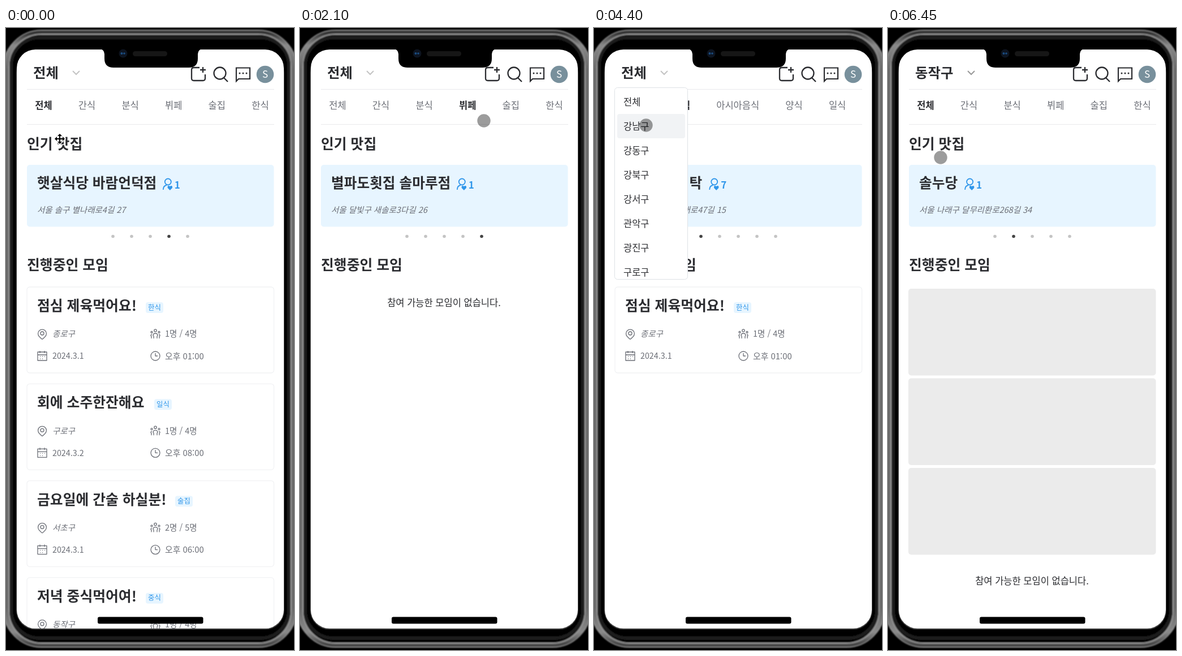
Animation of 509 by 1100 pixels, one loop 6600 ms. Source, as an HTML page:

```html
<!DOCTYPE html>
<html lang="ko">
<head>
<meta charset="utf-8">
<style>
html, body { margin: 0; width: 100%; height: 100%; overflow: hidden; background: #000; }
svg { display: block; width: 509px; height: 1100px; font-family: "Noto Sans CJK KR", "Noto Sans CJK", sans-serif; }
text { white-space: pre; }
</style>
</head>
<body>
<svg viewBox="0 0 509 1100">
  <defs>
    <clipPath id="screen"><rect x="19" y="38" width="472" height="1024" rx="33"/></clipPath>
    <clipPath id="tabs"><rect x="37" y="110" width="437" height="60"/></clipPath>
    <clipPath id="slides"><rect x="36" y="240" width="438" height="114"/></clipPath>
    <clipPath id="menu"><rect x="37" y="106" width="128" height="338"/></clipPath>
    <linearGradient id="metal" x2="0" y2="1">
      <stop offset="0" stop-color="#333"/><stop offset=".02" stop-color="#8a8a8a"/>
      <stop offset=".06" stop-color="#666"/><stop offset=".94" stop-color="#666"/>
      <stop offset=".98" stop-color="#8a8a8a"/><stop offset="1" stop-color="#444"/>
    </linearGradient>
    <filter id="soft" x="-5%" width="110%"><feGaussianBlur stdDeviation=".9"/></filter>
  </defs>
  <g filter="url(#soft)">
    <rect x="-5" y="4" width="519" height="1091" rx="68" stroke="#a0a0a0" stroke-width="2"/>
    <rect x="0" y="9" width="509" height="1081" rx="62" stroke="url(#metal)" stroke-width="9"/>
    <rect x="5" y="11" width="499" height="1077" rx="58" stroke="#9c9c9c" stroke-width="2"/>
    <rect x="9" y="17" width="491" height="1062" rx="50" stroke="#1c1c1c" stroke-width="6"/>
  </g>
  <rect x="18" y="45" width="474" height="1019" rx="34" fill="#3c3c3c"/>
  <rect x="19" y="38" width="472" height="1024" rx="33" fill="#fff"/>
  <g id="view" clip-path="url(#screen)"></g>
  <path d="M165 37h183q-8 0-9 9v8q0 16-16 16H190q-16 0-16-16v-8q-1-9-9-9z"/>
  <rect x="224" y="41" width="61" height="9" rx="4.5" fill="#161616"/>
  <circle cx="207" cy="45" r="7.5" fill="#0d1420"/>
  <circle cx="204.5" cy="45" r="2" fill="#1b4c80"/><circle cx="209" cy="45" r="1.8" fill="#1b4c80"/>
  <rect x="162" y="1041.500" width="186.500" height="12" rx="3"/>
</svg>
<script>
const LOOP = 6600;
const INK = '#2b2c30', GRAY = '#6b6e76', BLUE = '#2f96ea';

const ICONS = {
  pin: 'M9 11a3 3 0 1 0 6 0a3 3 0 0 0-6 0M17.2 16.7L13.4 20.500a2 2 0 0 1-2.8 0L6.8 16.7a7.400 7.400 0 1 1 10.4 0z',
  people: 'M9.8 6a2.200 2.200 0 1 0 4.400 0a2.200 2.200 0 0 0-4.400 0M9 20v-4l-1-1q0-4 4-4t4 4l-1 1v4' +
    'M4 9a1.500 1.500 0 1 0 3 0a1.500 1.500 0 0 0-3 0M17 9a1.500 1.500 0 1 0 3 0a1.500 1.500 0 0 0-3 0' +
    'M5 20v-4q-1 0-1-1q0-2 2-2M19 20v-4q1 0 1-1q0-2-2-2',
  calendar: 'M4 5h16v15H4zM8 3v4M16 3v4M4 10h16M8 13h1M12 13h1M16 13h1M8 17h1M12 17h1',
  clock: 'M4 12a8 8 0 1 0 16 0a8 8 0 0 0-16 0M12 7v5h4',
};

const PLACES = [
  ['초록창문식탁', 7, '서울 해늘구 고래대로47길 15'],
  ['솔누당', 1, '서울 나래구 달무리환로268길 34'],
  null,
  ['햇살식당 바람언덕점', 1, '서울 솔구 별나래로4길 27'],
  ['별파도횟집 솔마루점', 1, '서울 달빛구 새솔로3다길 26'],
];
const MEETINGS = [
  ['점심 제육먹어요!', 247, '한식', '종로구', '1명 / 4명', '2024.3.1', '오후 01:00'],
  ['회에 소주한잔해요', 262, '일식', '구로구', '1명 / 4명', '2024.3.2', '오후 08:00'],
  ['금요일에 간술 하실분!', 299, '술집', '서초구', '2명 / 5명', '2024.3.1', '오후 06:00'],
  ['저녁 중식먹어여!', 247, '중식', '동작구', '1명 / 4명', '2024.3.1', '오후 07:00'],
];
const TABS = ['전체', '간식', '분식', '뷔페', '술집', '한식', '아시아음식', '양식', '일식', '중식'];
const DISTRICTS = ['전체', ...'강남 강동 강북 강서 관악 광진 구로 금천 노원 도봉 동대문 동작 마포 서대문 서초'
  .split(' ').map(name => name + '구')];

// Keyframes: [time, value, ...]
const CURSOR = [[0, 95, 196], [500, 95, 190], [800, 143, 140], [1000, 145, 140], [1200, 210, 143], [1400, 219, 143],
  [1800, 296, 148], [2100, 325, 164], [2400, 375, 142], [2600, 400, 140], [2700, 422, 139], [3000, 451, 139],
  [3200, 449, 139], [3700, 175.500, 144], [4000, 120, 80], [4200, 118, 80], [4400, 92, 172], [4500, 110, 165],
  [4800, 266, 140], [5200, 255, 140], [5400, 130, 140], [5700, 400, 140], [5900, 70, 140],
  [6000, 120, 79], [6200, 92, 222], [6300, 93, 229]];
const SCROLL = [[3200, 0], [3700, 228.5], [4000, 294.5], [5400, 294.5], [5800, 0]];
const MENU_SCROLL = [[6000, 0], [6300, 418]];
const SLIDES = [[300, 3], [3100, 4], [5850, 0]];
// Steps: [time, value]
const TAB = [[0, 0], [900, 1], [1400, 2], [1800, 3], [2400, 4], [3200, 5], [4900, 6], [5900, 0]];
const DISTRICT = [[0, '전체'], [4500, '강남구'], [6450, '동작구']];
const LIST = [[0, [0, 1, 2, 3]], [900, []], [2500, [2]], [3200, [0]], [4500, []]];
const LOADING = [[1400, 1500], [1800, 1900], [2400, 2500], [4500, 4700], [4900, 5000], [6450, 6600]];
const MENU_OPEN = [[4100, 4500], [6000, 6450]];

const step = (keys, t) => keys.findLast(k => k[0] <= t)[1];
const within = (spans, t) => spans.some(([a, b]) => t >= a && t < b);
function tween(keys, t) {
  const i = keys.findIndex(k => k[0] > t);
  if (i <= 0) return keys.at(i).slice(1);
  const a = keys[i - 1], b = keys[i], p = (t - a[0]) / (b[0] - a[0]);
  return a.slice(1).map((v, j) => v + (b[j + 1] - v) * p);
}

const text = (x, cy, size, s, color = INK, attrs = '') =>
  `<text x="${x}" y="${cy + size * .37}" font-size="${size}" fill="${color}" ${attrs}>${s}</text>`;
const BOLD = 'font-weight="700"', ITALIC = 'font-style="italic"', MIDDLE = 'text-anchor="middle"';
const rect = (x, y, w, h, r, fill, attrs = '') =>
  `<rect x="${x}" y="${y}" width="${w}" height="${h}" rx="${r}" fill="${fill}" ${attrs}/>`;
const line = (d, color, width = 1, attrs = '') =>
  `<path d="${d}" fill="none" stroke="${color}" stroke-width="${width}" ${attrs}/>`;
const dot = (x, y, r, fill, attrs = '') => `<circle cx="${x}" cy="${y}" r="${r}" fill="${fill}" ${attrs}/>`;
const icon = (name, cx, cy) =>
  line(ICONS[name], GRAY, 1.3, `transform="translate(${cx - 12} ${cy - 12})" stroke-linejoin="round"`);

function header(t) {
  const name = step(DISTRICT, t), x = name.length > 2 ? 147 : 124;
  return text(48, 79, 24.4, name, INK, BOLD) +
    line(`M${x - 6} 76l6 6l6-6`, t >= 6450 ? '#999' : '#c4c4c4', 2) +
    line('M342 70h-10q-4 0-4 4v15q0 4 4 4h16q4 0 4-4v-7M348 69v10M343 74h10', INK, 2.3) +
    line('M367.5 80a10.5 10.5 0 1 0 21 0a10.5 10.5 0 0 0-21 0M385 88l7 7', INK, 2.3) +
    line('M407 94V70.5h24V90H411z', INK, 2.2) +
    [413, 419, 425].map(x => dot(x, 80, 1.5, INK)).join('') +
    dot(458, 82, 15.3, '#78909c') + text(458, 82, 17, 'S', '#fff', MIDDLE) +
    line('M37 108.5H474M37 170.5H474', '#e9e9ec');
}

function tabs(t) {
  const active = step(TAB, t), [scroll] = tween(SCROLL, t);
  const items = TABS.map((name, i) => {
    const x = 66.4 + 76.6 * i + (i > 5 ? 22.7 : 0) + (i > 6 ? 22.7 : 0);
    return text(x - scroll, 137, 16.5, name, i === active ? INK : GRAY, MIDDLE + (i === active ? ' ' + BOLD : ''));
  });
  return `<g clip-path="url(#tabs)">${items.join('')}</g>`;
}

function place([name, fans, address], x) {
  const spaces = name.split(' ').length - 1;
  const end = 55 + (name.length - spaces) * 22.7 + spaces * 5.5;
  const ix = end + 12;
  return `<g transform="translate(${x})">${rect(37, 242, 436.5, 109.5, 5, '#e7f5ff')}` +
    text(55, 274, 24.7, name, INK, BOLD) + text(55, 322, 14.5, address, GRAY, ITALIC) +
    text(end + 33, 278, 17, fans, BLUE, BOLD) +
    line(`M${ix + 4} 272a5.5 5.5 0 1 0 11 0a5.5 5.5 0 0 0-11 0M${ix + 1} 286q0-7 6-8`, BLUE, 1.8) +
    `<path d="M${ix + 13} 287l-4-4q-1-4 2-4l2 1l2-1q3 0 2 4z" fill="${BLUE}"/></g>`;
}

function carousel(t) {
  let current = 3, shift = 0;
  for (const [start, from] of SLIDES) {
    if (t <= start) break;
    const p = Math.min(1, (t - start) / 450);
    current = (from + 1) % 5;
    shift = 440 * (1 - p) ** 2;
  }
  const cards = place(PLACES[current], shift) + (shift ? place(PLACES[(current + 4) % 5], shift - 440) : '');
  return `<g clip-path="url(#slides)">${cards}</g>` +
    [0, 1, 2, 3, 4].map(i => dot(189 + 33 * i, 368.5, 2.8, i === current ? '#444' : '#c4c4c4')).join('');
}

function meeting([title, tagX, tag, district, people, date, hour], y) {
  return rect(37, y, 436.5, 152, 5, '#fff', 'stroke="#f1f2f4" stroke-width="1.3"') +
    text(55, y + 33, 24.8, title, INK, BOLD) +
    rect(tagX, y + 27, 31, 19, 4, '#e7f5ff') + text(tagX + 15.5, y + 36, 12.4, tag, BLUE, MIDDLE) +
    icon('pin', 64, y + 83) + text(82, y + 83, 14.4, district, GRAY, ITALIC) +
    icon('people', 264, y + 83) + text(281, y + 83, 14.5, people, GRAY) +
    icon('calendar', 64, y + 122) + text(82, y + 122, 14.3, date, GRAY) +
    icon('clock', 264, y + 122) + text(281, y + 122, 14.9, hour, GRAY);
}

function list(t) {
  const loading = within(LOADING, t), shown = step(LIST, t);
  const empty = y => text(254.5, y, 16.5, '참여 가능한 모임이 없습니다.', INK, MIDDLE);
  if (loading) return [461, 619.5, 778].map(y => rect(36, y, 437.5, 153.5, 5, '#ebebeb')).join('') + empty(978);
  return shown.map((m, i) => meeting(MEETINGS[m], 458 + 171.3 * i)).join('') || empty(486);
}

function menu(t) {
  if (!within(MENU_OPEN, t)) return '';
  const [scroll] = tween(MENU_SCROLL, t), [, cursorY] = tween(CURSOR, t);
  const options = DISTRICTS.map((name, i) => {
    const y = 109 + 43 * i - scroll, hover = cursorY >= y && cursorY < y + 43;
    return (hover ? rect(41, y, 120, 43, 4, '#f1f3f5') : '') + text(52, y + 21.5, 16.5, name);
  });
  return rect(36.5, 105.5, 129, 339, 5, '#fff', 'stroke="#dee2e6"') +
    `<g clip-path="url(#menu)">${options.join('')}</g>`;
}

function cursor(t) {
  const [x, y] = tween(CURSOR, t);
  if (t >= 100) return dot(x, y, 11.7, '#000', 'opacity=".39"');
  const arrows = 'M0-9l4 4H1v4h4v-3l4 4l-4 4V1H1v4h3l-4 4l-4-4h3V1h-4v3l-4-4l4-4v3h4v-4h-3z';
  return `<path d="${arrows}" transform="translate(${x} ${y})" stroke="#fff" stroke-width="3" paint-order="stroke"/>`;
}

const view = document.getElementById('view');
let last = -1;
function frame(now) {
  const time = now % LOOP;
  const t = time >= 6450 ? 6450 : Math.floor(Math.min(time, 6300) / 100) * 100;
  if (t !== last) {
    last = t;
    view.innerHTML = header(t) + tabs(t) + text(37, 205, 24.8, '인기 맛집', INK, BOLD) + carousel(t) +
      text(37, 419, 24.8, '진행중인 모임', INK, BOLD) + list(t) + menu(t) + cursor(t);
  }
  requestAnimationFrame(frame);
}
requestAnimationFrame(frame);
</script>
</body>
</html>
```
